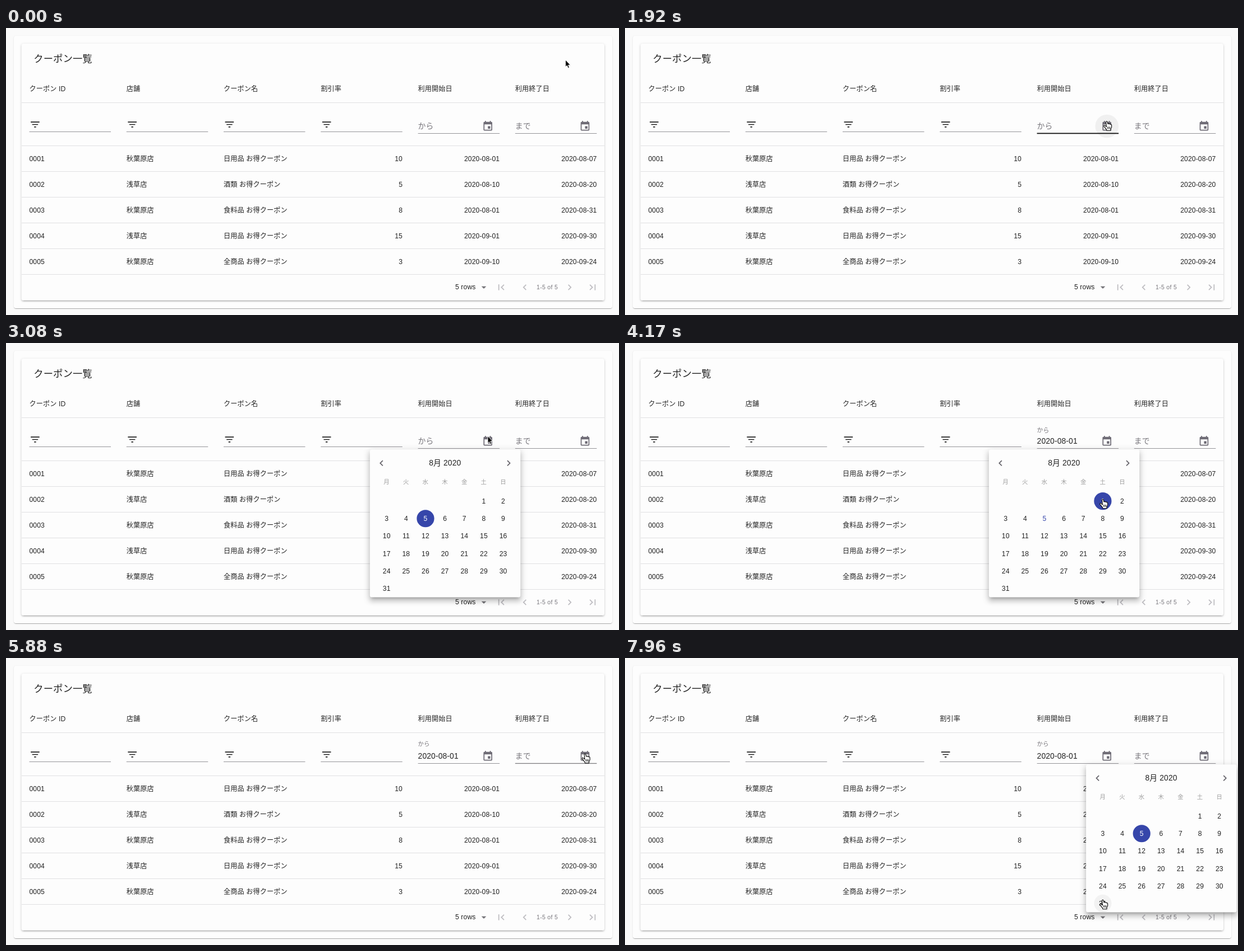
Write an HTML page that moves like this. It is 1093x513 px and loops after 8000 ms.

```html
<!DOCTYPE html>
<html lang="ja">
<head>
<meta charset="utf-8">
<title>クーポン一覧</title>
<style>
  html, body { margin: 0; width: 100%; height: 100%; overflow: hidden; background: #fafafa; }
  svg { display: block; }
  text {
    font-family: "Liberation Sans", "Noto Sans CJK JP", "Noto Sans CJK", sans-serif;
    font-size: 12.13px; letter-spacing: .0107em; fill: rgba(0,0,0,.87); white-space: pre;
  }
  .title { font-size: 17.3px; letter-spacing: .0075em; }
  .input { font-size: 13.86px; letter-spacing: .0094em; }
  .caption { font-size: 10.4px; letter-spacing: .0333em; }
  .grey { fill: #78767c; }
  .faint { fill: rgba(0,0,0,.38); }
</style>
</head>
<body>
<svg id="stage" width="1093" height="513" viewBox="0 0 1093 513"></svg>
<script>
const LOOP = 8000;
const SCALE = 0.8665;
const COLUMN = 173.25;
const PRIMARY = '#3646aa';
const TODAY = 5;
const stage = document.getElementById('stage');

const ICONS = {
  filter: 'M10 18h4v-2h-4v2zM3 6v2h18V6H3zm3 7h12v-2H6v2z',
  event: 'M17 12h-5v5h5v-5zM16 1v2H8V1H6v2H5c-1.11 0-1.99.9-1.99 2L3 19c0 1.1.89 2 2 2h14c1.1 0 2-.9 2-2V5c0-1.1-.9-2-2-2h-1V1h-2zm3 18H5V8h14v11z',
  down: 'M7 10l5 5 5-5z',
  first: 'M18.41 16.59L13.82 12l4.59-4.59L17 6l-6 6 6 6zM6 6h2v12H6z',
  prev: 'M15.41 7.41L14 6l-6 6 6 6 1.41-1.41L10.83 12z',
  next: 'M10 6L8.59 7.41 13.17 12l-4.58 4.59L10 18l6-6z',
  last: 'M5.59 7.41L10.18 12l-4.59 4.59L7 18l6-6-6-6zM16 6h2v12h-2z'
};

function add(parent, tag, attrs, content) {
  const el = document.createElementNS('http://www.w3.org/2000/svg', tag);
  set(el, attrs);
  if (content !== undefined) el.textContent = content;
  return parent.appendChild(el);
}
function set(el, attrs) {
  for (const key in attrs) el.setAttribute(key, attrs[key]);
}
const label = (parent, x, y, content, cls = '', anchor = 'start') =>
  add(parent, 'text', { x, y, class: cls, 'text-anchor': anchor }, content);
const icon = (parent, name, cx, cy, fill) =>
  add(parent, 'path', { d: ICONS[name], fill,
    transform: `translate(${cx} ${cy}) scale(${SCALE}) translate(-12 -12)` });
const line = (parent, x, y, width, fill, height = 1) =>
  add(parent, 'rect', { x, y, width, height, fill });

// Each shadow is [offset, blur, spread, alpha].
function paper(parent, x, y, width, height, shadows, fill) {
  for (const [dy, blur, spread, alpha] of shadows) {
    const s = spread * SCALE;
    add(parent, 'rect', { x: x - s, y: y - s + dy * SCALE, width: width + 2 * s, height: height + 2 * s,
      rx: 3.5, fill: `rgba(0,0,0,${alpha})`, style: `filter:blur(${blur * SCALE / 2}px)` });
  }
  add(parent, 'rect', { x, y, width, height, rx: 3.5, fill });
}

function buildTable() {
  add(stage, 'rect', { width: 1093, height: 513, fill: '#fafafa' });
  paper(stage, 14, 14, 1067, 487, [[2, 1, -1, .2], [1, 1, 0, .14], [1, 3, 0, .12]], '#fdfdfd');
  paper(stage, 27.5, 28, 1039.5, 459, [[3, 1, -2, .2], [2, 2, 0, .14], [1, 5, 0, .12]], '#fdfdfd');
  label(stage, 49.3, 61, 'クーポン一覧', 'title');

  ['クーポン ID', '店舗', 'クーポン名', '割引率', '利用開始日', '利用終了日']
    .forEach((name, i) => label(stage, 41.5 + i * COLUMN, 113.3, name));
  for (let i = 0; i < 4; i++) {
    const x = 41.5 + i * COLUMN;
    icon(stage, 'filter', x + 10.4, 172.5, 'rgba(0,0,0,.87)');
    line(stage, x, 185, 145.5, '#949398');
  }
  line(stage, 28, 133, 1039, '#e0e0e2');

  const rows = [
    ['秋葉原店', '日用品', 10, '08-01', '08-07'],
    ['浅草店', '酒類', 5, '08-10', '08-20'],
    ['秋葉原店', '食料品', 8, '08-01', '08-31'],
    ['浅草店', '日用品', 15, '09-01', '09-30'],
    ['秋葉原店', '全商品', 3, '09-10', '09-24']
  ];
  rows.forEach(([shop, goods, rate, from, to], i) => {
    const y = 238.2 + i * 46;
    const left = ['000' + (i + 1), shop, goods + ' お得クーポン'];
    left.forEach((value, c) => label(stage, 41.5 + c * COLUMN, y, value));
    [rate, '2020-' + from, '2020-' + to].forEach((value, c) =>
      label(stage, 707 + c * COLUMN, y, value, '', 'end'));
  });
  for (let i = 0; i < 6; i++) line(stage, 28, 210 + i * 46, 1039, '#e0e0e2');

  label(stage, 801, 467.3, '5 rows');
  icon(stage, 'down', 852, 463.5, '#757479');
  label(stage, 946, 467.2, '1-5 of 5', 'caption grey');
  [['first', 883], ['prev', 925], ['next', 1005], ['last', 1046]]
    .forEach(([name, x]) => icon(stage, name, x, 463.5, '#bdbcc0'));
}

function buildField(index, hint) {
  const x = 734.6 + index * COLUMN;
  const cx = x + 124.6;
  const halo = add(stage, 'circle', { cx, cy: 175.5, r: 20.8 });
  const hintText = label(stage, 0, 0, hint, 'input grey');
  const value = label(stage, x, 180, '2020-08-01', 'input');
  icon(stage, 'event', cx, 175.6, '#6f6c76');
  line(stage, x, 188, 145.5, '#949398');
  const hoverLine = line(stage, x, 187.5, 145.5, '#111', 1.8);
  return { x, cx, halo, hintText, value, hoverLine };
}

const dayX = (index, col) => 678.7 + index * COLUMN + col * 34.64;
const dayY = row => 282.6 + row * 31.17;

function buildCalendar(index) {
  const root = add(stage, 'g', {});
  const dx = index * COLUMN;
  paper(root, 648.8 + dx, 190.3, 268.5, 264.3,
    [[5, 5, -3, .2], [8, 10, 1, .14], [3, 14, 2, .12]], '#fdfdfd');
  icon(root, 'prev', 669.5 + dx, 214.8, '#66646b');
  icon(root, 'next', 896.3 + dx, 214.8, '#66646b');
  label(root, 782.8 + dx, 219.3, '8月 2020', 'input', 'middle');
  [...'月火水木金土日'].forEach((name, c) =>
    label(root, dayX(index, c), 251.8, name, 'caption faint', 'middle'));
  const hover = add(root, 'circle', { r: 15.6, fill: 'rgba(0,0,0,.045)' });
  const disc = add(root, 'circle', { r: 15.6, fill: PRIMARY });
  const days = [];
  for (let day = 1; day <= 31; day++) {
    const cell = day + 4;
    const cx = dayX(index, cell % 7), cy = dayY(Math.floor(cell / 7));
    const text = label(root, cx, cy + 4.4, day, '', 'middle');
    days.push({ day, cx, cy, text });
  }
  return { root, hover, disc, days, originX: 807 + dx };
}

function buildCursors() {
  const arrow = add(stage, 'path', { d: 'M0 0V12.6L2.8 10 4.8 14.6 6.9 13.7 5 9.2H8.9Z',
    fill: '#000', stroke: '#fff', 'stroke-width': .9 });
  const hand = add(stage, 'g', {});
  add(hand, 'path', { fill: '#fff', stroke: '#000', 'stroke-width': 1.1, 'stroke-linejoin': 'round',
    d: 'M-1.4 1.5C-1.4-.2.9-.2 1.2 1.4L1.9 5C2.2 3.8 3.9 4 4.2 5.3 4.6 4.3 6.2 4.6 6.5 5.9 7.2 5.2 8.5 5.7 8.6 7V11L7 14V16.8H0L-.6 14.8-5 9.4C-6 7.8-4.2 6.6-3 7.8L-.6 10Z' });
  add(hand, 'path', { d: 'M1.4 10V14M3.6 10V14M5.7 10V14', stroke: '#000', 'stroke-width': .9 });
  return { arrow, hand };
}

const clamp = v => Math.min(1, Math.max(0, v));
const mix = (a, b, p) => a + (b - a) * p;
const smooth = p => p * p * (3 - 2 * p);

// Standard easing, cubic-bezier(.4, 0, .2, 1).
function ease(p) {
  let lo = 0, hi = 1;
  for (let i = 0; i < 20; i++) {
    const u = (lo + hi) / 2;
    const x = 1.2 * u * (1 - u) ** 2 + .6 * u * u * (1 - u) + u ** 3;
    if (x < p) lo = u; else hi = u;
  }
  return smooth(lo);
}
const ramp = (t, start, duration) => ease(clamp((t - start) / duration));

const POPUP_TIME = 313;
const PICK = 4050;
const TIMES = [
  { hover: 1480, press: 2260, open: 2350, close: 5520 },
  { hover: 5835, press: 6660, open: 6755, close: Infinity }
];
// [start, end, x, y]
const MOVES = [
  [700, 1750, 859, 166.5],
  [3200, 3800, 852, 279],
  [4250, 4950, 1038, 161.5],
  [5100, 5450, 1032.5, 171],
  [7150, 7850, 852, 432]
];

function pointer(t) {
  let x = 997.5, y = 57;
  for (const [start, end, toX, toY] of MOVES) {
    const p = smooth(clamp((t - start) / (end - start)));
    x = mix(x, toX, p);
    y = mix(y, toY, p);
  }
  return { x, y };
}

buildTable();
const fields = [buildField(0, 'から'), buildField(1, 'まで')];
const calendars = [buildCalendar(0), buildCalendar(1)];
const cursors = buildCursors();

function drawField(i, t, tip, blocked) {
  const f = fields[i], { hover, press, open } = TIMES[i];
  const filled = i === 0 && t >= PICK;
  const shrink = filled ? ramp(t, PICK, 200) : 0;
  set(f.hintText, { transform:
    `translate(${f.x} ${mix(179.6, 157.2, shrink)}) scale(${mix(1, .75, shrink)})` });
  set(f.value, { opacity: filled ? 1 : 0 });
  set(f.hoverLine, { opacity: ramp(t, hover, 200) * (1 - ramp(t, open, 200)) });
  const over = !blocked && Math.hypot(tip.x - f.cx, tip.y - 175.5) < 20.8;
  const glow = ramp(t, hover + 30, 150) * (1 - ramp(t, open, 150)) * .05;
  const ripple = ramp(t, press, 100) * (1 - ramp(t, open, 550)) * .13;
  set(f.halo, { 'fill-opacity': glow + ripple });
  return over;
}

function drawCalendar(i, t, tip) {
  const c = calendars[i], { open, close } = TIMES[i];
  const visible = t >= open && t < close + POPUP_TIME;
  set(c.root, { display: visible ? 'inline' : 'none' });
  if (!visible) return false;

  const closing = t >= close;
  const opacity = closing ? 1 - ramp(t, close, POPUP_TIME) : ramp(t, open, POPUP_TIME);
  const grow = closing ? 1 - ramp(t, close + POPUP_TIME / 3, POPUP_TIME * 2 / 3)
                       : ramp(t, open, POPUP_TIME * 2 / 3);
  set(c.root, { opacity, transform: `translate(${c.originX} 190.3) ` +
    `scale(${mix(.75, 1, grow)} ${mix(.5625, 1, grow)}) translate(${-c.originX} -190.3)` });

  const chosen = i === 0 && t >= PICK ? 1 : TODAY;
  let hovered = null;
  for (const d of c.days) {
    const fill = d.day === chosen ? '#fff' : d.day === TODAY ? PRIMARY : 'rgba(0,0,0,.87)';
    d.text.style.fill = fill;
    if (d.day === chosen) set(c.disc, { cx: d.cx, cy: d.cy });
    if (Math.hypot(tip.x - d.cx, tip.y - d.cy) < 15.6) hovered = d;
  }
  set(c.hover, { opacity: hovered ? 1 : 0 });
  if (hovered) set(c.hover, { cx: hovered.cx, cy: hovered.cy });
  return hovered !== null;
}

function render(t) {
  const tip = pointer(t);
  const blocked = TIMES.some(({ open, close }) => t >= open && t < close + POPUP_TIME);
  let pointing = false;
  for (let i = 0; i < 2; i++) {
    const onField = drawField(i, t, tip, blocked);
    const onDay = drawCalendar(i, t, tip);
    pointing = pointing || onField || onDay;
  }
  const transform = `translate(${tip.x} ${tip.y})`;
  set(cursors.arrow, { transform, opacity: pointing ? 0 : 1 });
  set(cursors.hand, { transform, opacity: pointing ? 1 : 0 });
}

const began = performance.now();
function tick() {
  render((performance.now() - began) % LOOP);
  requestAnimationFrame(tick);
}
tick();
</script>
</body>
</html>
```
